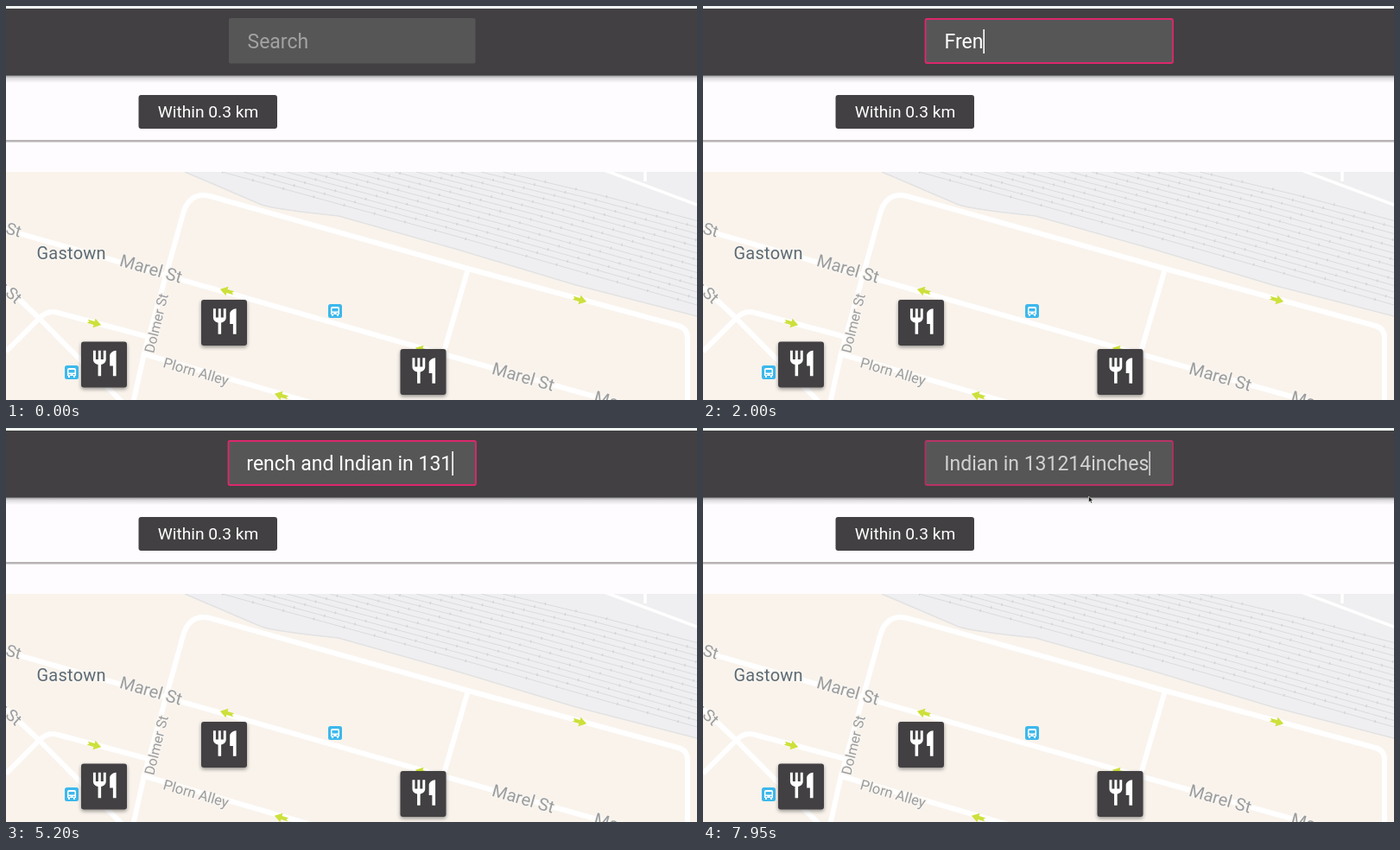
An HTML page that plays this animation: 800 by 456 pixels, repeating every 8000 ms.

```html
<!DOCTYPE html>
<html lang="en">
<head>
<meta charset="utf-8">
<title>Map search</title>
<style>
  html, body { margin: 0; width: 100%; height: 100%; overflow: hidden; }
  svg { display: block; width: 800px; height: 456px; font-family: Roboto, sans-serif; }
  text { white-space: pre; }
  .roads { fill: none; stroke: #fff; stroke-width: 6; stroke-linejoin: round; }
  .labels text { fill: #9a9da0; stroke: #faf5ef; stroke-width: 3; paint-order: stroke; }
  .rails { fill: none; stroke: #dadbde; }
  .ties { stroke: #d3d5d9; stroke-width: 3; stroke-dasharray: 1.5 35; }
  .marker { filter: drop-shadow(0 2px 2px #0006); }
</style>
</head>
<body>
<svg viewBox="0 0 800 456">
  <defs>
    <linearGradient id="shade" x2="0" y2="1">
      <stop stop-color="#000" stop-opacity=".42"/>
      <stop offset=".4" stop-color="#000" stop-opacity=".13"/>
      <stop offset="1" stop-color="#000" stop-opacity="0"/>
    </linearGradient>
    <clipPath id="mapArea"><rect y="192" width="800" height="264"/></clipPath>
    <clipPath id="fieldArea"><rect x="279.5" y="14" width="240" height="52"/></clipPath>
    <path id="arrow" d="M-8-2H0V-5.500L8.500 0 0 5.500V2H-8L-6 0z" fill="#cde03b"/>
    <g id="bus">
      <rect x="-8" y="-8" width="16" height="16" rx="2.500" fill="#3db8ec"/>
      <path d="M-5-3q0-2 2-2h6q2 0 2 2v7h-1v2h-2v-2h-4v2h-2v-2h-1z" fill="#fff"/>
      <path d="M-3.500-3h7v3.500h-7zM-3.500 2h2v1.300h-2zM1.500 2h2v1.300h-2z" fill="#3db8ec"/>
    </g>
    <g id="marker" class="marker">
      <rect width="53" height="53" rx="3" fill="#424042"/>
      <path transform="translate(9.500 7.200) scale(1.480)" fill="#fff"
        d="M11 9H9V2H7v7H5V2H3v7c0 2.100 1.700 3.800 3.800 4v9h2.400v-9c2.100-.2 3.800-1.900 3.800-4V2h-2zM16 6v8h2.500v8H21V2c-2.800 0-5 2.200-5 4z"/>
    </g>
  </defs>

  <rect width="800" height="456" fill="#fefcff"/>

  <g clip-path="url(#mapArea)">
    <rect y="192" width="800" height="264" fill="#f9f3ec"/>
    <path d="M207 192L296 230Q310 235 385 243L520 281 660 323 800 359V192z" fill="#efeff1"/>
    <path d="M207 192L296 230Q310 235 385 243L520 281 660 323 800 359" fill="none" stroke="#e2e2e3" stroke-width="1.500"/>
    <g id="rails" class="rails"></g>
    <path d="M682 186L800 230M740 186V203" fill="none" stroke="#fff" stroke-width="3.500"/>
    <g class="roads">
      <path d="M0 259L510 404 710 460"/>
      <path d="M147 460L160 402 204 244Q211 214 236 220L535 304 778 370Q789 373 789 384V460"/>
      <path d="M535 304L507 400"/>
      <path d="M0 400L38 362Q48 351 60 355L165 383"/>
      <path d="M0 325L38 361 136 460"/>
      <path d="M157 402L360 461"/>
    </g>
    <use href="#arrow" transform="translate(256 330) rotate(196)"/>
    <use href="#arrow" transform="translate(102 367) rotate(16)"/>
    <use href="#arrow" transform="translate(664 340) rotate(16)"/>
    <use href="#arrow" transform="translate(319 451) rotate(196)"/>
    <use href="#arrow" transform="translate(482 398) rotate(196)"/>
    <g id="labels" class="labels"></g>
    <text x="35.500" y="293" font-size="20" letter-spacing=".25" fill="#5c6a74" stroke="#faf5ef" stroke-width="3" paint-order="stroke">Gastown</text>
    <use href="#bus" x="381" y="353"/>
    <use href="#bus" x="76" y="424"/>
    <use href="#marker" x="226" y="340"/>
    <use href="#marker" x="87" y="388.500"/>
    <use href="#marker" x="456.500" y="397"/>
  </g>

  <rect y="155" width="800" height="2.500" fill="#b8b4b6"/>
  <rect y="80" width="800" height="9" fill="url(#shade)"/>
  <rect width="800" height="3" fill="#eef6f4"/>
  <rect y="3" width="800" height="77.500" fill="#424042"/>

  <rect x="153.500" y="103" width="160.500" height="39" rx="3" fill="#424042"/>
  <text x="234" y="129" font-size="19.200" text-anchor="middle" fill="#fff">Within 0.3 km</text>

  <rect x="258" y="14" width="285.500" height="52.500" rx="2" fill="#575657"/>
  <rect id="ring" x="257.500" y="15" width="286.500" height="51" rx="2" fill="none" stroke="#dc286d" stroke-width="1.800"/>
  <g clip-path="url(#fieldArea)">
    <text id="query" y="49" font-size="23"></text>
    <rect id="caret" y="27" width="1.600" height="28" fill="#fff"/>
  </g>
  <path id="pointer" d="M0 0V7L1.700 5.500 2.800 8 4 7.500 3 5H5z" fill="#111" stroke="#fff" stroke-width=".5"/>
</svg>

<script>
const LOOP = 8000, FOCUS = 50, BLUR = 7800, FADE = 450, BLINK = 500;
const LEFT = 279.5, RIGHT = 516.3;
const PHRASE = 'French and Indian in 131214inches';
const KEY_TIMES = [
  1500, 1650, 1800, 1950, 2100, 2250, 2400, 2500, 2600, 2700, 2850,
  3000, 3200, 3300, 3450, 3600, 3800, 4100, 4300, 4450, 4600,
  4800, 5150, 5200, 5300, 5350, 5450, 6150, 6250, 6350, 6500, 6650, 6850
];
const byId = id => document.getElementById(id);
const clamp = v => Math.max(0, Math.min(1, v));

function add(parent, tag, attrs, text = '') {
  const node = document.createElementNS('http://www.w3.org/2000/svg', tag);
  for (const name in attrs) node.setAttribute(name, attrs[name]);
  node.textContent = text;
  parent.append(node);
}

for (let i = 0; i < 14; i++) {
  const x = 250 + i * 25, y = 346 - i * 7.5;
  const d = `M${x} 192Q${(x + 800) / 2} ${(192 + y) / 2 - 3} 800 ${y}`;
  add(byId('rails'), 'path', { d });
  add(byId('rails'), 'path', { d, class: 'ties', 'stroke-dashoffset': i * 13 });
}

// text, centre x, centre y, angle, size
[
  ['Marel St', 168, 304, 16, 20],
  ['Marel St', 599, 429, 16, 20],
  ['Marel St', 717, 462, 16, 20],
  ['Dolmer St', 174, 367, -76, 16],
  ['Plorn Alley', 220, 423, 16, 16.5],
  ['St', 9, 259, 16, 19],
  ['r St', 5, 331, 42, 19]
].forEach(([text, x, y, angle, size]) => add(byId('labels'), 'text', {
  transform: `translate(${x} ${y}) rotate(${angle})`,
  y: size * 0.35, 'font-size': size, 'text-anchor': 'middle'
}, text));

const pen = document.createElement('canvas').getContext('2d');
pen.font = '23px Roboto, sans-serif';

function draw(now) {
  const t = (now + 10) % LOOP;
  const count = KEY_TIMES.filter(time => time <= t).length;
  const typed = PHRASE.slice(0, count);
  const width = pen.measureText(typed).width;
  const start = Math.min(LEFT, RIGHT - width);
  const lastKey = count ? KEY_TIMES[count - 1] : FOCUS;
  const fadeOut = clamp((t - BLUR) / 600);
  const query = byId('query');

  query.textContent = typed || 'Search';
  query.setAttribute('x', start);
  query.setAttribute('fill', typed ? '#fff' : '#a3a2a3');
  query.setAttribute('opacity', 1 - fadeOut);

  const caretOn = t >= FOCUS && Math.floor((t - lastKey) / BLINK) % 2 === 0;
  byId('caret').setAttribute('x', start + width);
  byId('caret').setAttribute('opacity', caretOn ? 1 - fadeOut : 0);
  byId('ring').setAttribute('opacity', clamp((t - FOCUS) / FADE) * (1 - fadeOut));

  byId('pointer').setAttribute('visibility', t >= 7850 ? 'visible' : 'hidden');
  byId('pointer').setAttribute('transform', 'translate(446.5 79)');
}

function tick() {
  draw(performance.now());
  requestAnimationFrame(tick);
}
tick();
</script>
</body>
</html>
```
